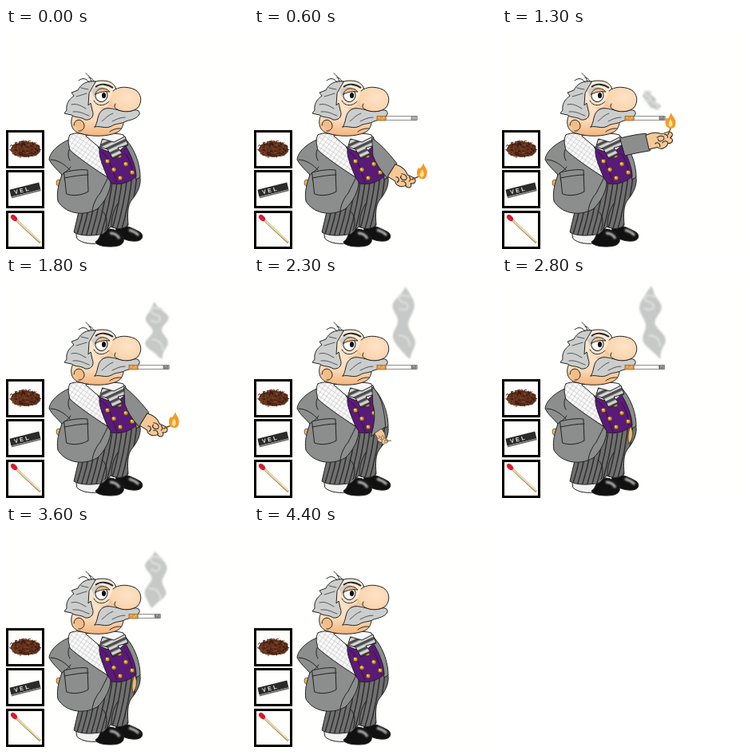
These frames come from a looping animation (303x277 px, 4500 ms). An HTML page:

```html
<!DOCTYPE html>
<html lang="en">
<head>
<meta charset="utf-8">
<title>A quiet smoke</title>
<style>
html, body { margin: 0; width: 100%; height: 100%; overflow: hidden; background: #fffffd; }
svg { display: block; width: 303px; height: 277px; }
.ink { stroke: #222; stroke-linejoin: round; stroke-linecap: round; }
.line { fill: none; stroke: #222; stroke-linecap: round; stroke-linejoin: round; }
.coat { fill: #8b8e8c; }
.hair { fill: #cbcecd; }
.flesh { fill: #f6c896; }
</style>
</head>
<body>
<svg viewBox="0 0 303 277">
  <defs>
    <radialGradient id="nose" cx=".6" cy=".4" r=".75">
      <stop offset="0" stop-color="#fde2c6"/><stop offset=".7" stop-color="#fad5b0"/><stop offset="1" stop-color="#f0b57f"/>
    </radialGradient>
    <linearGradient id="skin" x1="0" y1="0" x2="0" y2="1">
      <stop offset="0" stop-color="#fdebd8"/><stop offset=".7" stop-color="#fbdcbc"/><stop offset="1" stop-color="#f2b57c"/>
    </linearGradient>
    <pattern id="check" width="5" height="5" patternUnits="userSpaceOnUse" patternTransform="rotate(35)">
      <rect width="5" height="5" fill="#fafafa"/><path d="M0 0H5M0 0V5" stroke="#aaa" stroke-width=".8"/>
    </pattern>
    <pattern id="bands" width="7" height="7" patternUnits="userSpaceOnUse" patternTransform="rotate(-25)">
      <rect width="7" height="7" fill="#d5d5d5"/><rect width="7" height="3.5" fill="#4c4c4c"/>
    </pattern>
    <filter id="soft" x="-30%" y="-30%" width="160%" height="160%"><feGaussianBlur stdDeviation=".8"/></filter>
    <clipPath id="legs"><use href="#trousers"/></clipPath>
  </defs>

  <!-- shoes -->
  <path class="ink" fill="#111" d="M138 247C148 246 159 251 168 256C173 260 171 266 164 267C154 268 144 264 138 259Z"/>
  <path class="ink" fill="#f2f2f2" d="M88 256C95 250 112 250 124 253L120 269C109 272 94 270 89 264Z"/>
  <path class="ink" fill="#111" d="M120 254C130 249 142 253 147 263C149 271 142 274 131 274C121 274 113 272 112 268C117 265 118 259 120 254Z"/>
  <path d="M130 257C136 257 140 260 142 264M154 253C160 255 164 257 166 260" fill="none" stroke="#bbb" stroke-width="3" filter="url(#soft)"/>

  <!-- trousers -->
  <path id="trousers" class="ink" fill="#707070" d="M110 182C126 196 151 194 167 184C171 195 164 208 157 216C152 223 152 234 153 247C147 253 137 252 131 249L122 258C108 261 93 261 85 256L92 226Z"/>
  <g id="stripes" clip-path="url(#legs)" fill="none" stroke="#303030" stroke-width="1.6"></g>
  <path class="line" d="M132 249C132 239 134 229 140 220M120 229C126 234 128 242 124 254"/>

  <!-- waistcoat -->
  <path class="ink coat" d="M146 136C157 144 168 166 168 187L163 190C162 171 154 157 145 146Z"/>
  <path class="ink" fill="#5a1a78" d="M108 139C123 153 137 154 148 145C156 157 163 174 163 186C154 194 142 198 129 194C122 181 113 169 108 139Z"/>
  <path d="M119 155C128 160 132 174 139 194M149 157C156 166 158 177 159 186" fill="none" stroke="#35104b"/>
  <g id="buttons"></g>

  <!-- coat -->
  <ellipse class="ink" cx="66" cy="194" rx="3" ry="4" fill="#f0b85f" stroke-width=".6"/>
  <path class="ink coat" d="M81 139C66 145 55 155 54 165C58 173 65 178 70 184C66 195 63 206 65 217C74 232 95 237 114 227C124 218 131 204 131 193C123 181 114 172 110 158L95 147Z"/>
  <path class="line" d="M56 165C65 165 75 172 80 178M70 184C73 181 78 179 81 174M83 146C78 152 76 159 80 166M113 174L128 187L118 207C112 214 109 222 108 229"/>
  <path class="ink coat" d="M73 181C84 178 95 177 102 178L103 205C95 210 83 211 76 208Z"/>
  <path class="line" d="M73 188C83 186 95 184 103 184"/>

  <!-- scarf and tie -->
  <path class="ink" fill="url(#check)" d="M80 134C87 130 97 132 109 137L117 152C116 161 121 172 127 187C108 175 91 163 80 153C78 145 77 139 80 134Z"/>
  <path class="ink" fill="#f8f8f8" d="M100 135C117 131 138 131 147 134L152 145L140 156C128 157 117 151 109 143Z"/>
  <path class="ink" fill="url(#bands)" d="M121 139L135 143L149 136L153 147L140 150L146 158L134 164L127 152L118 149Z"/>

  <!-- head -->
  <path class="ink" fill="url(#skin)" d="M101 80C101 70 110 66 121 66C132 66 138 72 138 79L143 104C149 112 149 126 139 131C127 136 108 137 93 132C82 130 79 118 84 109Z"/>
  <path class="ink hair" d="M112 67C102 65 93 71 90 78L82 81L85 85C78 90 75 96 76 103L73 107L82 109C87 113 94 111 99 115C107 116 111 110 108 103L106 94L103 97L104 82Z"/>
  <path class="line" stroke-width=".7" d="M88 86L101 82M82 96C90 94 94 98 100 101M84 105C93 104 98 108 104 110M94 75L103 77"/>
  <path class="line" d="M104 68C101 63 95 62 91 66M107 67C105 61 102 58 100 57M110 67C108 63 106 62 104 62"/>
  <path class="ink" fill="#f4bd88" d="M85 122C85 114 94 113 97 119C100 124 96 130 91 129"/>
  <path class="hair" d="M107 79C110 73 117 72 122 75L113 80L110 87Z"/>
  <path d="M111 96C118 104 128 100 134 91L136 80C140 86 128 102 126 106Z" fill="#f4bd88" filter="url(#soft)"/>
  <ellipse class="ink" cx="119.500" cy="84.500" rx="7.500" ry="8" fill="#fff" transform="rotate(15 119.500 84.500)"/>
  <path class="ink" fill="#f4bd88" d="M112 83C113 75 124 73 130 80C123 79 118 80 112 83Z"/>
  <ellipse cx="122.500" cy="84.500" rx="2.600" ry="3.500" fill="#111"/>
  <path d="M112 74C118 69 127 70 134 75" fill="none" stroke="#222" stroke-width="1.800"/>
  <path class="line" d="M110 91C114 99 124 98 129 92"/>
  <path class="ink hair" d="M111 124C116 119 113 107 122 102C132 97 143 107 157 104C164 101 168 104 167 108C164 114 156 115 150 117C143 121 138 119 132 123C124 127 118 122 111 124Z"/>
  <path class="line" stroke-width=".7" d="M120 117C125 113 128 109 134 107M133 117C139 114 143 112 149 112"/>
  <path fill="url(#nose)" d="M134 79C140 73 152 73 161 77C170 82 171 93 165 100C158 106 146 106 139 102C129 101 127 92 131 88Z"/>
  <path class="line" d="M134 79C140 73 152 73 161 77C170 82 171 93 165 100C158 106 146 106 139 102C136 101 135 98 137 95M130 130C135 126 140 126 144 126"/>

  <!-- supplies -->
  <g id="boxes" fill="#fffffd" stroke="#000" stroke-width="3"></g>
  <path fill="#5f321e" d="M5 153L9 146L17 144L25 142L35 144L42 148L43 155L38 160L25 162L11 160Z"/>
  <g id="leaf" fill="none"></g>
  <g transform="rotate(-14 24 203)">
    <rect x="5" y="198" width="38" height="9" fill="#2b2b2b"/>
    <path d="M5 207H43V209H5Z" fill="#777"/>
    <text x="10" y="205" fill="#eee" font-family="Liberation Sans, Arial, sans-serif" font-weight="700" font-size="7" letter-spacing="2.5">VEL</text>
  </g>
  <path d="M10 238L43 269" stroke="#9b8050" stroke-width="3"/>
  <path d="M10 238L43 268" stroke="#f0dfae" stroke-width="1.800"/>
  <ellipse cx="10" cy="238" rx="4.800" ry="3" fill="#d51c31" transform="rotate(44 10 238)"/>

  <!-- moving parts -->
  <path id="rest" class="ink" fill="#eebd62" d="M161 187C165 193 164 203 159 209C157 202 158 194 161 187Z" stroke-width=".6"/>
  <g id="arm">
    <path id="sleeve" class="ink coat"/>
    <g id="hand">
      <path class="ink flesh" d="M-1-9C8-11 14-10 19-6L28-7C34-5 32 0 28 1C33 4 29 9 24 7C20 13 13 13 10 9L-1 9Z"/>
      <path class="line" d="M12-3C18-6 22-2 20 1C16 4 12 2 13-1M17 5C20 2 24 4 24 7M8 4C11 2 15 5 13 9M22-5C25-4 26-2 25 0"/>
      <path d="M26-3L33-13" stroke="#7a4a20" stroke-width="1.500"/>
      <g id="flame">
        <path fill="#f39a2b" d="M0 8C-7 7-8-1-5-6C-4-3-2-5 1-12C2-7 7-5 6 1C6 6 4 8 0 8Z"/>
        <path fill="#ffe28a" d="M0 6C-4 5-3 0 0-4C2-1 4 4 0 6Z"/>
      </g>
    </g>
  </g>
  <g id="cigarette">
    <rect id="paper" x="165" y="110.500" height="5" fill="#f8f8f8" stroke="#777" stroke-width=".8"/>
    <rect x="154" y="110.500" width="11" height="5.500" fill="#e89a3c" stroke="#8b5720" stroke-width=".7"/>
    <path d="M156 112h1m3 2h1m1-2h1" stroke="#fff0b0"/>
    <g id="ash">
      <rect x="-7" y="110.500" width="7" height="5" rx="1" fill="#bbb" stroke="#666" stroke-width=".7"/>
      <path id="ember" d="M-6 111v4m2-3v3m2-4v4" stroke="#555"/>
    </g>
  </g>
  <g id="smoke" filter="url(#soft)">
    <path id="cloud" fill="#c6c9c7"/>
    <path id="curl" fill="none" stroke="#dcdedc" stroke-width="2.500"/>
  </g>
</svg>
<script>
const STEP = 100, LOOP = 4500;
const APPEAR = 100, LIGHTING = 1250, RESTING = 2400, SMOKE = 1200, PUFF = 1800, SMOKE_END = 4200, GONE = 4300;

const $ = id => document.getElementById(id);
const set = (id, attrs) => { for (const k in attrs) $(id).setAttribute(k, attrs[k]); };
const show = (id, on) => set(id, { visibility: on ? 'visible' : 'hidden' });
const add = (id, tag, attrs) => {
  const el = document.createElementNS('http://www.w3.org/2000/svg', tag);
  for (const k in attrs) el.setAttribute(k, attrs[k]);
  $(id).appendChild(el);
};
const clamp = v => Math.max(0, Math.min(1, v));
const mix = (a, b, p) => a + (b - a) * p;
const smooth = p => p * p * (3 - 2 * p);

let seed = 7;
const rand = () => (seed = seed * 16807 % 2147483647) / 2147483647;

function drawDetails() {
  for (const y of [128, 178, 229]) add('boxes', 'rect', { x: 1.5, y: y + 1.5, width: 45, height: 45 });
  for (let x = 90; x < 180; x += 6) add('stripes', 'path', { d: `M${x + 8} 183Q${x + 5} 220 ${x - 8} 262` });
  for (let i = 0; i < 6; i++) {
    const row = i >> 1, side = i % 2;
    const cx = 127 + 8 * row + 15 * side, cy = 167 + 10.5 * row - 7 * side;
    add('buttons', 'circle', { cx, cy, r: 2.7, fill: '#d7a52f', stroke: '#5a3a10', 'stroke-width': .7 });
    add('buttons', 'circle', { cx: cx - .7, cy: cy - .8, r: .9, fill: '#ffeb9a' });
  }
  const browns = ['#2c120b', '#8b4b2c', '#713820', '#44200f'];
  for (let i = 0; i < 150; i++) {
    const a = rand() * 2 * Math.PI, r = Math.sqrt(rand());
    const x = 24 + 19 * r * Math.cos(a), y = 152.5 + 10 * r * Math.sin(a);
    add('leaf', 'path', {
      d: `M${x} ${y}q${rand() * 4 - 2} -3 ${rand() * 6 - 3} ${rand() * 4 - 2}`,
      stroke: browns[i % 4]
    });
  }
}

// The arm leaves the pocket, lifts the match and returns the same way.
function drawArm(t) {
  const away = Math.abs(t - LIGHTING);
  const out = smooth(clamp((1150 - away) / 450));
  const lift = smooth(clamp((550 - away) / 400));
  show('arm', t >= APPEAR && t < RESTING);
  show('rest', t >= RESTING && t < GONE);

  const x = mix(mix(153, 173, out), 183, lift);
  const y = mix(mix(196, 179, out), 143, lift);
  const turn = mix(mix(60, 32, out), -13, lift);
  const angle = turn * Math.PI / 180, dx = 11 * Math.sin(angle), dy = 11 * Math.cos(angle);
  set('sleeve', {
    d: `M148 138Q${mix(162, 168, lift)} ${mix(148, 133, lift)} ${x + dx} ${y - dy}` +
       `L${x - dx} ${y + dy}Q${mix(154, 166, lift)} ${mix(174, 157, lift)} ${mix(149, 154, lift)} 160Z`
  });
  set('hand', { transform: `translate(${x} ${y}) rotate(${turn}) scale(${mix(.5, 1, out)})` });
  const sway = 6 * Math.sin(t / 70);
  set('flame', { transform: `translate(33 -18) rotate(${sway - turn})`, opacity: out > .8 ? 1 : 0 });
}

const tipAt = t => 204 - 32 * clamp((t - 2500) / 1700) ** 2.5;

function drawCigarette(t) {
  const tip = tipAt(t);
  show('cigarette', t >= APPEAR && t < GONE);
  set('paper', { width: Math.max(0, tip - 165) });
  set('ash', { transform: `translate(${tip} 0)` });
  set('ember', { opacity: t >= SMOKE ? 1 : .3 });
}

// A column with two swellings that rises, then starts again from the tip.
function drawSmoke(t) {
  show('smoke', t >= SMOKE && t < GONE);
  if (t < SMOKE) return;
  const age = (t - SMOKE) % PUFF;
  const top = t < SMOKE_END ? Math.max(12, 90 - .097 * age) : 94;
  const low = 103, height = low - top, root = tipAt(t) - 8;
  const radius = Math.min(14, 6 + height * .13);
  const center = u => mix(187, root, u ** 4) - 8 * (1 - u) * clamp(1 - height / 40) + 2 * Math.sin(5 * u + t / 300);
  const half = u => radius * Math.sqrt(Math.sin(Math.PI * u)) * (.8 - .36 * Math.cos(4 * Math.PI * u) * clamp(height / 50));
  const points = [];
  for (let i = 0; i <= 48; i++) {
    const side = i <= 24 ? 1 : -1, u = clamp((i <= 24 ? i : 48 - i) / 24);
    const w = Math.max(0, half(u) || 0) + Math.sin(17 * u + side + t / 200);
    points.push(`${center(u) + side * w} ${top + height * u}`);
  }
  set('cloud', { d: `M${points.join('L')}Z` });

  const c = center(.22), y = top + height * .22, r = radius * .5;
  const k = center(.75), z = top + height * .75;
  set('curl', {
    d: `M${c + r} ${y - r}C${c - 2 * r} ${y - 2 * r} ${c - r} ${y} ${c} ${y}S${c + r} ${y + 2 * r} ${c - r} ${y + r}` +
       `M${k - r} ${z - r}Q${k + r} ${z - r} ${k + r} ${z + r}`
  });
}

drawDetails();
const start = performance.now();
let last = -1;
function tick() {
  const t = Math.floor((performance.now() - start) % LOOP / STEP) * STEP;
  if (t !== last) {
    last = t;
    drawArm(t);
    drawCigarette(t);
    drawSmoke(t);
  }
  requestAnimationFrame(tick);
}
tick();
</script>
</body>
</html>
```
